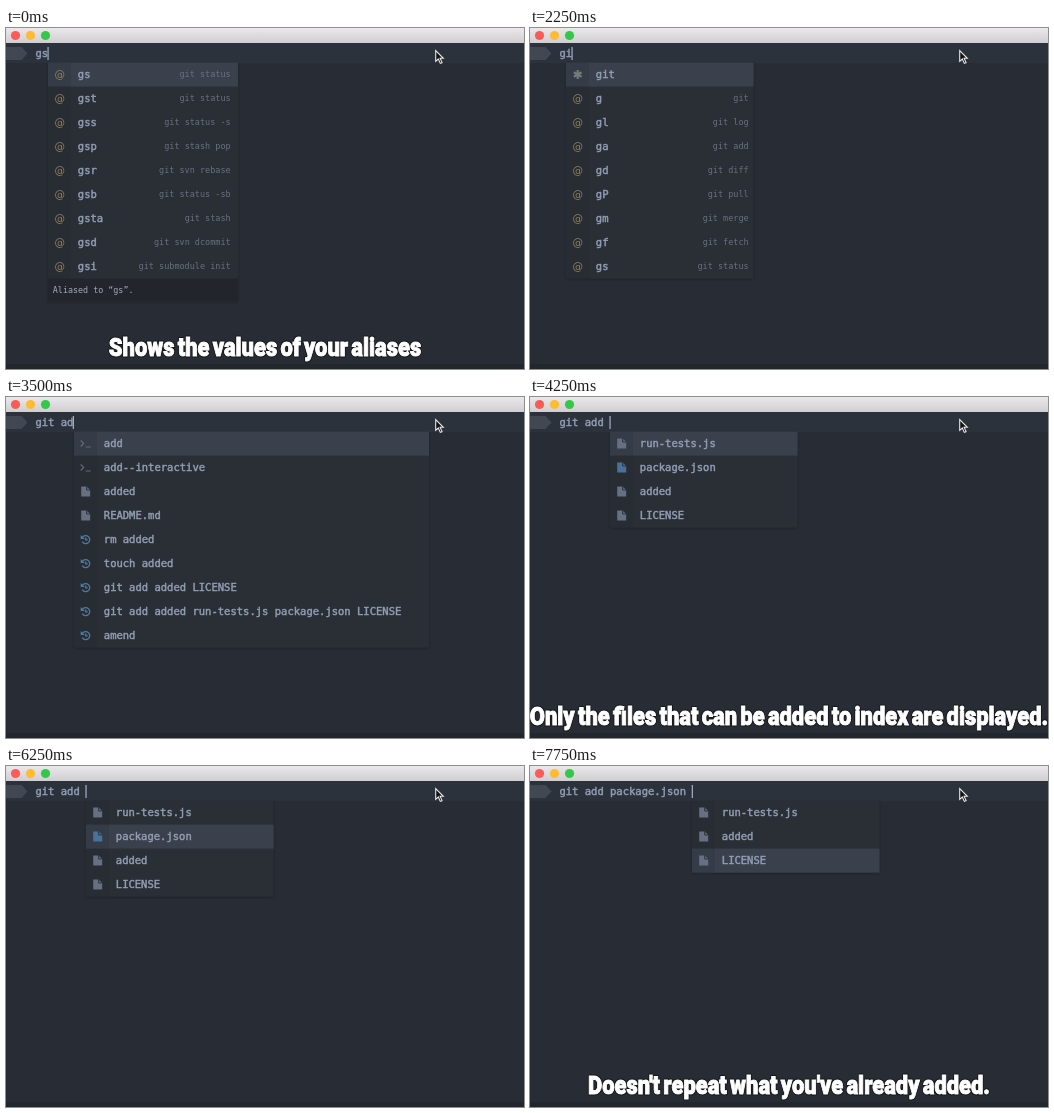
These frames come from a looping animation (518x341 px, 8000 ms). An HTML page:

```html
<!DOCTYPE html>
<html lang="en">
<head>
<meta charset="utf-8">
<title>Terminal completion</title>
<style>
html, body { margin: 0; width: 100%; height: 100%; overflow: hidden; background: #282c34; }
svg { display: block; width: 518px; height: 341px; }
text { white-space: pre; font: 10.53px "DejaVu Sans Mono", monospace; fill: #929eb5; stroke: #929eb5; stroke-width: .45px; }
.green { fill: #82aa6e; stroke: #82aa6e; }
.red { fill: #b8636e; stroke: #b8636e; }
.hint { font-size: 8.5px; fill: #687080; stroke: none; text-anchor: end; }
.desc { font-size: 8.4px; fill: #a3abb9; stroke: none; }
.at { font: 10.5px "DejaVu Sans", sans-serif; fill: #8f8158; stroke: none; text-anchor: middle; }
.caption { font: 900 26.5px Roboto, sans-serif; font-stretch: 75%; word-spacing: -2.7px; fill: #fff; stroke: #fff; stroke-width: 1px; text-anchor: middle; }
.outline { stroke: #14161a; stroke-width: 3px; stroke-linejoin: round; }
</style>
</head>
<body>
<svg viewBox="0 0 518 341">
  <defs>
    <linearGradient id="bar" x2="0" y2="1"><stop stop-color="#eae8ea"/><stop offset="1" stop-color="#d0ced0"/></linearGradient>
    <filter id="shadow" x="-10%" y="-10%" width="120%" height="125%"><feDropShadow dx="0" dy="1" stdDeviation="1.5" flood-color="#000" flood-opacity=".25"/></filter>
  </defs>
  <rect width="518" height="341" fill="#282c34"/>
  <rect y="336" width="518" height="5" fill="#22262d"/>
  <g id="screen"></g>
  <rect width="518" height="15" fill="url(#bar)"/>
  <circle cx="9.5" cy="7.5" r="4.6" fill="#fc5b57"/>
  <circle cx="24.5" cy="7.5" r="4.6" fill="#fdbc33"/>
  <circle cx="39.5" cy="7.5" r="4.6" fill="#34c84a"/>
  <path d="M429.7 22.5v10.8l2.6-2.3 2 4.4 1.8-.8-2-4.3h3.2z" fill="#111" stroke="#e8e8e8" stroke-width="1.1"/>
</svg>
<script>
const screen = document.getElementById('screen');
const LOOP = 8000, CHAR = 6.33, LEFT = 29.4, ROW = 24, TOP = 34.6;

const esc = s => s.replace(/&/g, '&amp;').replace(/</g, '&lt;');
const text = (x, y, s, cls = '') => `<text x="${x}" y="${y}" class="${cls}">${esc(s)}</text>`;
const rect = (x, y, w, h, fill) => `<rect x="${x}" y="${y}" width="${w}" height="${h}" fill="${fill}"/>`;

const page = fill => `<path d="M-4.5-5h5.5l3.5 3.5v6.5h-9z" fill="${fill}"/><path d="M1-5v3.5h3.5" fill="none" stroke="#282c34" stroke-width=".9"/>`;
const icons = {
  alias: '<text y="3.6" class="at">@</text>',
  star: '<path d="M0-4.5v9M-3.9-2.3l7.8 4.6M-3.9 2.3l7.8-4.6" stroke="#747c77" stroke-width="2.2"/>',
  cmd: '<path d="M-5-3l3 3-3 3M0 3.5h5" fill="none" stroke="#646b78" stroke-width="1.1"/>',
  file: page('#667083'),
  json: page('#48729a'),
  past: '<path d="M-3.3-2.2A4 4 0 1 1-3.4 2.2M0-2v2.3h2" fill="none" stroke="#4f7c9f" stroke-width="1.3"/><path d="M-5-4.6v4h4z" fill="#4f7c9f"/>'
};

// Each row: icon, name, optional hint
const rows = (icon, list) => list.split(',').map(s => [icon, ...s.split(':')]);
const statusList = rows('alias', 'gs:git status,gst:git status,gss:git status -s,gsp:git stash pop,gsr:git svn rebase,gsb:git status -sb,gsta:git stash,gsd:git svn dcommit,gsi:git submodule init');
const gitList = [['star', 'git'], ...rows('alias', 'g:git,gl:git log,ga:git add,gd:git diff,gP:git pull,gm:git merge,gf:git fetch,gs:git status')];
const subList = rows('cmd', 'add,add--interactive,am,annotate,apply,archimport,archive,bisect,bisect--helper');
const adList = [...rows('cmd', 'add,add--interactive'), ...rows('file', 'added,README.md'),
  ...rows('past', 'rm added,touch added,git add added LICENSE,git add added run-tests.js package.json LICENSE,amend')];
const tests = ['file', 'run-tests.js'], others = rows('file', 'added,LICENSE');
const addList = [tests, ['json', 'package.json'], ...others];
const restList = [tests, ...others];

const output = `On branch master
Your branch is up-to-date with 'origin/master'.
Changes to be committed:
  (use "git reset HEAD <file>..." to unstage)

        modified:   LICENSE
        new file:   added
        deleted:    run-tests.js

Changes not staged for commit:
  (use "git add <file>..." to update what will be committed)
  (use "git checkout -- <file>..." to discard changes in working directory)

        modified:   package.json`.split('\n');

const captions = [
  [0, 750, 'Shows the values of your aliases'],
  [4250, 6250, 'Only the files that can be added to index are displayed.'],
  [6750, 8000, "Doesn't repeat what you've already added."]
];

const popup = (list, x, sel = 0, w = 187.5, desc = '') => ({ list, x, sel, w, desc });

// Start time, typed line, popup
const steps = [
  [0, 'gs', popup(statusList, 42, 0, 190, 'Aliased to “gs”.')],
  [500, 'gs'],
  [750, 'gs'],
  [1750, 'g', popup(gitList, 36)],
  [2250, 'gi', popup(gitList, 36)],
  [2500, 'git'],
  [2750, 'git ', popup(subList, 55)],
  [3000, 'git a', popup(subList, 55)],
  [3250, 'git ad', popup(subList, 61)],
  [3500, 'git ad', popup(adList, 68, 0, 355)],
  [4000, 'git add'],
  [4250, 'git add ', popup(addList, 80, 0)],
  [4750, 'git add ', popup(addList, 80, 1)],
  [5250, 'git add ', popup(addList, 80, 2)],
  [5750, 'git add ', popup(addList, 80, 3)],
  [6000, 'git add ', popup(addList, 80, 2)],
  [6250, 'git add ', popup(addList, 80, 1)],
  [6750, 'git add package.json ', popup(restList, 162, 0)],
  [7250, 'git add package.json ', popup(restList, 162, 1)],
  [7750, 'git add package.json ', popup(restList, 162, 2)]
];

function prompt(y, line, caret) {
  const x = LEFT + line.length * CHAR;
  return rect(0, y - 10.5, 518, 20, '#2c323b') +
    `<path d="M0 ${y - 6.5}h15.5l6 6.5-6 6.5H0z" fill="#414854"/>` +
    text(LEFT, y + 3.8, line) +
    (caret ? rect(x - .6, y - 6.5, 1.2, 13, '#a4b0c6') : '');
}

function drawPopup({ list, x, sel, w, desc }) {
  const h = list.length * ROW, end = TOP + h;
  let s = `<g filter="url(#shadow)">${rect(x, TOP, w, h + (desc ? 23 : 0), '#292d35')}</g>`;
  s += rect(x, TOP + sel * ROW, w, ROW, '#3a404c') + rect(x, TOP, 23, h, 'rgba(30,34,40,.15)');
  list.forEach(([icon, name, hint], i) => {
    const y = 46 + i * ROW;
    s += `<g transform="translate(${x + 11.7} ${y + .5})">${icons[icon]}</g>` + text(x + 29.8, y + 3.8, name);
    if (hint) s += text(x + 182.7, y + 3, hint, 'hint');
  });
  if (desc) s += rect(x, end, w, 23, '#22262c') + text(x + 4.8, end + 14.2, desc, 'desc');
  return s;
}

function drawOutput(caret) {
  const color = s => /package/.test(s) ? 'red' : /^ {8}/.test(s) ? 'green' : '';
  return output.map((s, i) => text(6.5, 52 + i * 13.54, s, color(s))).join('') + prompt(248.5, '', caret);
}

const drawCaption = s => '<g transform="translate(259 328) scale(.828 1)">' +
  text(0, 0, s, 'caption outline') + text(0, 0, s, 'caption') + '</g>';

function scene(t) {
  const [, line, list] = steps.filter(s => s[0] <= t).pop();
  const done = t >= 750 && t < 1750;
  let s = prompt(25.5, line, !done);
  if (done) s += drawOutput(t < 1250);
  if (list) s += drawPopup(list);
  const cap = captions.find(c => t >= c[0] && t < c[1]);
  if (cap) s += drawCaption(cap[2]);
  return s;
}

let last = '';
function frame(now) {
  const s = scene(Math.max(0, now - start) % LOOP);
  if (s !== last) screen.innerHTML = last = s;
  requestAnimationFrame(frame);
}
const start = performance.now();
frame(start);
</script>
</body>
</html>
```
